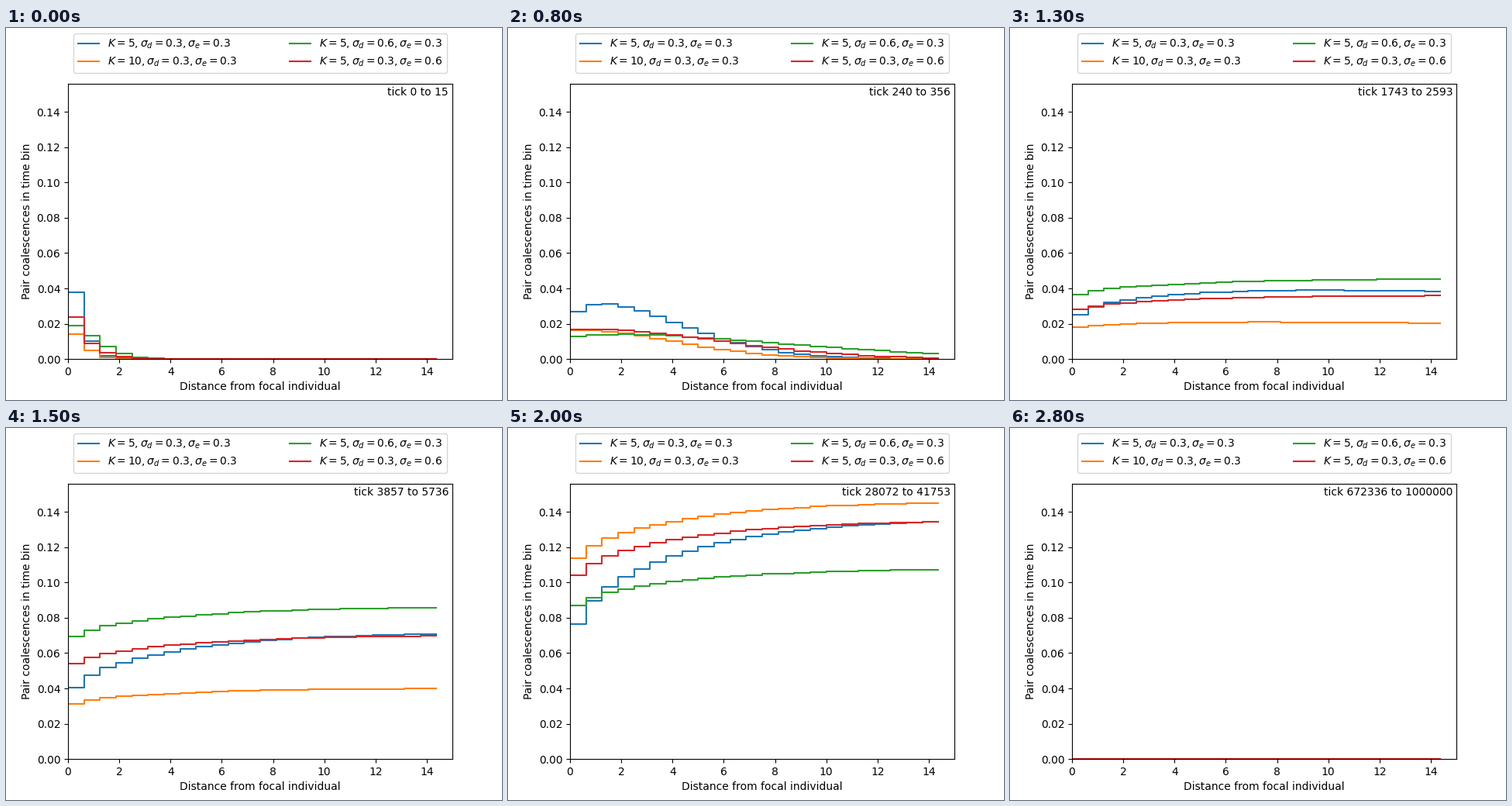
Recreate the animation shown at these times as a matplotlib script. Size 640 px wide and 480 px high, loop 2.9 s.

```python
import numpy as np
import matplotlib.pyplot as plt
from matplotlib.animation import FuncAnimation

FRAMES = 29
BINS = np.minimum(np.arange(24), 22)  # the last value closes the staircase
LEFT = np.arange(24) * 0.625
MID = (BINS + 0.5) * 0.625

# Logarithmic time bins; the first one starts at zero.
EDGES = np.logspace(1, 6, FRAMES + 1)
TIMES = np.sqrt(EDGES[:-1] * EDGES[1:])
EDGES[0] = 0

SPREAD, MIXED = 8, 13  # time bins between which the waves fill the habitat
MIXING_VAR = 69        # wave variance at which local ancestry is forgotten

# Late shortage of coalescences near the focal individual, zero at the far end.
SHORTAGE = 0.92 * np.exp(-MID / 4.5) + 0.3 * np.exp(-MID / 0.6)
SHORTAGE -= SHORTAGE[-1]

# first: height, rate and power of the drop in the first time bin
# wave:  height, variance, depth and width of the central dip, early boost
# late:  amplitude, time scale and central shortage of the final decay
CURVES = [
    dict(label=r"$K=5, \sigma_d=0.3, \sigma_e=0.3$",
         first=(0.038, 1.335, 1.15),
         wave=(0.035, 16, 0.345, 0.725, 1.1),
         late=(1.031, 22300, 0.434)),
    dict(label=r"$K=10, \sigma_d=0.3, \sigma_e=0.3$",
         first=(0.0142, 1.05, 1.25),
         wave=(0.0168, 15.8, 0.07, 0.5, 0.55),
         late=(1.025, 43600, 0.218)),
    dict(label=r"$K=5, \sigma_d=0.6, \sigma_e=0.3$",
         first=(0.019, 0.35, 1.5),
         wave=(0.015, 64, 0.17, 1.4, 1.3),
         late=(1.02, 16850, 0.19)),
    dict(label=r"$K=5, \sigma_d=0.3, \sigma_e=0.6$",
         first=(0.0238, 1.0, 0.93),
         wave=(0.018, 30.5, 0.09, 1.5, 0.8),
         late=(1.028, 22400, 0.227)),
]


def wave_variance(curve, i):
    return curve["wave"][1] * TIMES[i] / TIMES[SPREAD]


def diffusion(curve, i):
    """Gaussian wave that widens with time, with a dip near the centre."""
    height, _, depth, width, boost = curve["wave"]
    early = max(SPREAD - i, 0) / SPREAD
    gain = (1 + boost * early) * (1 - np.exp(-i))
    dip = 1 - depth * (1 - early) * np.exp(-MID / width)
    return height * gain * dip * np.exp(-MID**2 / (2 * wave_variance(curve, i)))


def settled(curve, i):
    """Exponential decay of the mixed population plus the rest of the wave."""
    amp, scale, shortage = curve["late"]
    mass = np.exp(-EDGES[i] / scale) - np.exp(-EDGES[i + 1] / scale)
    rest = np.exp(-wave_variance(curve, i) / MIXING_VAR)
    return amp * mass * (1 - shortage * SHORTAGE) + rest * diffusion(curve, i)


def profile(curve, i):
    if i == 0:
        height, rate, power = curve["first"]
        return height * np.exp(-rate * BINS**power)
    w = np.clip((i - SPREAD) / (MIXED - SPREAD), 0, 1)
    return diffusion(curve, i) ** (1 - w) * settled(curve, i) ** w


fig, ax = plt.subplots(figsize=(6.4, 4.8), dpi=100)
fig.subplots_adjust(left=0.125, right=0.9, bottom=0.11, top=0.85)
ax.set_xlim(0, 15)
ax.set_ylim(0, 0.1558)
ax.set_xlabel("Distance from focal individual")
ax.set_ylabel("Pair coalescences in time bin")

lines = [ax.plot(LEFT, profile(c, 0), drawstyle="steps-post", label=c["label"])[0]
         for c in CURVES]
tick_text = ax.text(0.99, 0.99, "", transform=ax.transAxes, ha="right", va="top")
ax.legend(bbox_to_anchor=(0, 1.02, 1, 0.102), loc="lower left", ncol=2, mode="expand")


def update(i):
    for line, curve in zip(lines, CURVES):
        line.set_ydata(profile(curve, i))
    tick_text.set_text(f"tick {EDGES[i]:.0f} to {EDGES[i + 1]:.0f}")
    return [*lines, tick_text]


anim = FuncAnimation(fig, update, frames=FRAMES, interval=100, repeat=True,
                     repeat_delay=0, blit=False)
plt.show()
```
